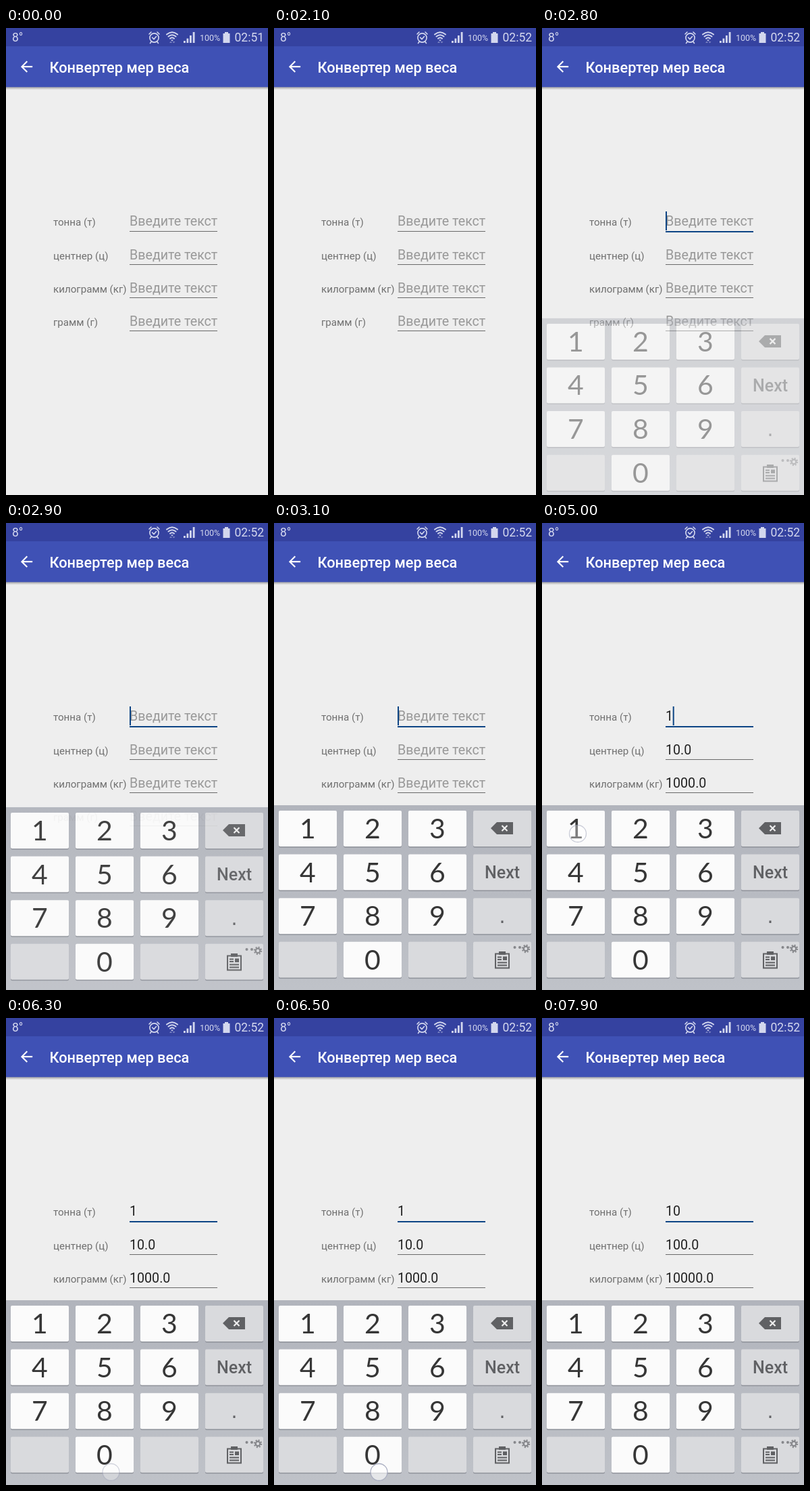
Recreate the animation shown at these times as an HTML page. Size 388x690 px, loop 8000 ms.

```html
<!DOCTYPE html>
<html lang="ru">
<head>
<meta charset="utf-8">
<title>Конвертер мер веса</title>
<style>
html, body { margin: 0; width: 100%; height: 100%; overflow: hidden; background: #eee; }
svg { display: block; width: 100%; height: 100%; font-family: Roboto, sans-serif; }
.label { font-size: 15.15px; fill: #707070; }
.value { font-size: 19.65px; }
.digit { font: 41px Lato, sans-serif; fill: #363636; text-anchor: middle; }
</style>
</head>
<body>
<svg id="stage" viewBox="0 0 388 690">
  <defs>
    <linearGradient id="shade" x2="0" y2="1">
      <stop offset="0" stop-opacity=".32"/><stop offset="1" stop-opacity="0"/>
    </linearGradient>
    <linearGradient id="board" x2="0" y2="1">
      <stop offset="0" stop-color="#b1b4bc"/><stop offset="1" stop-color="#c1c4ca"/>
    </linearGradient>
  </defs>
  <rect width="388" height="690" fill="#eee"/>
  <rect y="87" width="388" height="4.500" fill="url(#shade)"/>
  <rect width="388" height="87.300" fill="#3f51b5"/>
  <rect width="388" height="27" fill="#3542a0"/>

  <g fill="#d3d7ee">
    <text x="9" y="20" font-size="17.5">8°</text>
    <g fill="none" stroke="#d3d7ee" stroke-width="1.6" stroke-linecap="round">
      <circle cx="219.500" cy="14.500" r="6.600"/>
      <path d="M212 9l3-3M227 9l-3-3M215 20.500l-1.500 2M224 20.500l1.500 2M216.500 14l2.500 2.500 3.500-4"/>
      <path d="M238 9.500q8-6.500 16 0M240.500 12.500q5.500-4.500 11 0M243 15.500q3-2.500 6 0" stroke-width="2"/>
    </g>
    <path d="M244 17.500h4l-2 2z"/>
    <path d="M242 22l2-2.500 2 2.500zM246.500 20h4l-2 2.500z" opacity=".45"/>
    <path d="M263 19h2.800v3H263zM267.500 15.500h2.800V22h-2.800zM272 11h2.800v11H272zM276.700 6h2.800v16h-2.800z"/>
    <text x="287" y="19" font-size="12.5">100%</text>
    <path d="M324 6h5v2h2.500v14h-10V8h2.500z"/>
    <text id="clock" x="338.500" y="20" font-size="17.5"></text>
  </g>

  <path d="M20 11H7.800l5.600-5.600L12 4l-8 8 8 8 1.400-1.400L7.800 13H20z" transform="translate(17.600 44.200) scale(1.078)" fill="#fff"/>
  <text x="64.500" y="66" font-size="21.75" font-weight="500" fill="#fff">Конвертер мер веса</text>

  <g id="form"></g>
  <rect id="caret" y="271" width="2" height="28" fill="#0d4585"/>
  <g id="pad"></g>
  <circle id="touch" r="12.500" fill="#fff" fill-opacity=".6" stroke="#a9adc0" stroke-width="1.3"/>
</svg>
<script>
const LOOP = 8000, FOCUS = 2700, FIRST = 4800, SECOND = 7000;
const NS = 'http://www.w3.org/2000/svg';
const $ = id => document.getElementById(id);
const clamp = v => Math.max(0, Math.min(1, v));

function set(el, attrs) {
  for (const k in attrs) el.setAttribute(k, attrs[k]);
}

function add(parent, tag, attrs, text) {
  const el = document.createElementNS(NS, tag);
  set(el, attrs);
  if (text) el.textContent = text;
  return parent.appendChild(el);
}

// Form: each unit with its count per tonne
const units = [['тонна (т)', 1], ['центнер (ц)', 10], ['килограмм (кг)', 1000], ['грамм (г)', 1000000]];
const rows = units.map(([name, factor], i) => {
  const y = 292.4 + i * 49.1;
  add($('form'), 'text', { x: 70, y, class: 'label' }, name);
  return {
    factor,
    value: add($('form'), 'text', { x: 183, y, class: 'value' }),
    line: add($('form'), 'rect', { x: 183, y: Math.floor(y + 8), width: 130, height: 1, fill: '#6a6a6a' })
  };
});

// Number pad
const pad = $('pad');
add(pad, 'rect', { y: 417, width: 388, height: 310, fill: 'url(#board)' });
const digits = ['123', '456', '789', ' 0 '];
for (let r = 0; r < 4; r++) {
  for (let c = 0; c < 4; c++) {
    const x = 7 + c * 96, y = 425 + r * 64.6, d = (digits[r][c] || '').trim();
    add(pad, 'rect', { x, y: y + 1.5, width: 86, height: 53, rx: 2, fill: '#8f929a' });
    add(pad, 'rect', { x, y, width: 86, height: 53, rx: 2, fill: d ? '#fbfbfb' : '#d9dadd' });
    if (d) add(pad, 'text', { x: x + 43, y: y + 41, class: 'digit' }, d);
  }
}
const ink = '#606164';
add(pad, 'path', { d: 'M321 451l9-9h24v18h-24z', fill: ink });
add(pad, 'path', { d: 'M337.500 447l8 8m0-8l-8 8', stroke: '#eee', 'stroke-width': 2.2 });
add(pad, 'text', { x: 338, y: 525, 'font-size': 25, 'font-weight': 500, 'text-anchor': 'middle', fill: ink }, 'Next');
add(pad, 'rect', { x: 336.5, y: 587.5, width: 3, height: 3.5, fill: ink });
add(pad, 'path', {
  d: 'M328 636.500h20v21h-20zM331 641.500h6M331 645h6M331 649.500h14M331 653.500h14',
  fill: 'none', stroke: ink, 'stroke-width': 2
});
add(pad, 'path', { d: 'M333 633h10v5h-10zM339 640.500h6v5.500h-6z', fill: ink });
for (const cx of [356.5, 364]) add(pad, 'circle', { cx, cy: 627, r: 2, fill: '#85868a' });
add(pad, 'circle', { cx: 373, cy: 629, r: 3.3, fill: 'none', stroke: '#85868a', 'stroke-width': 2.2 });
add(pad, 'circle', {
  cx: 373, cy: 629, r: 5.2, fill: 'none', stroke: '#85868a', 'stroke-width': 2,
  'stroke-dasharray': `2 ${5.2 * Math.PI / 4 - 2}`
});

const taps = [
  { x: 250, y: 288, from: 2200, up: 2500, to: 2800 },
  { x: 53, y: 459, from: 4500, up: 4800, to: 5300 },
  { x: 155.5, y: 671, from: 6300, up: 6800, to: 7100 }
];

function caretOn(t) {
  if (t < FOCUS) return false;
  if (t < FIRST) return t < 3800 || t >= 4300;
  return Math.floor((t - (t < SECOND ? FIRST : SECOND)) / 500) % 2 === 0;
}

function draw(t) {
  $('clock').textContent = t < 300 ? '02:51' : '02:52';

  const typed = t < FIRST ? '' : t < SECOND ? '1' : '10';
  rows.forEach((row, i) => {
    row.value.textContent = !typed ? 'Введите текст' : i ? (typed * row.factor).toFixed(1) : typed;
    set(row.value, { fill: typed ? '#212121' : '#999' });
  });
  const focused = t >= FOCUS;
  set(rows[0].line, { height: focused ? 2 : 1, fill: focused ? '#0d4585' : '#6a6a6a' });
  set($('caret'), { x: 183 + typed.length * 10.7, opacity: caretOn(t) ? 1 : 0 });

  const p = clamp((t - FOCUS) / 300);
  set(pad, { transform: `translate(0 ${27 * (1 - p) ** 2})`, opacity: Math.min(1, p * 1.4) });

  const tap = taps.find(a => t >= a.from && t < a.to);
  set($('touch'), tap ? {
    cx: tap.x, cy: tap.y,
    opacity: Math.min(clamp((t - tap.from + 50) / 100), clamp((tap.to - t) / (tap.to - tap.up)))
  } : { opacity: 0 });
}

function tick(now) {
  draw(now % LOOP);
  requestAnimationFrame(tick);
}
draw(0);
requestAnimationFrame(tick);
</script>
</body>
</html>
```
